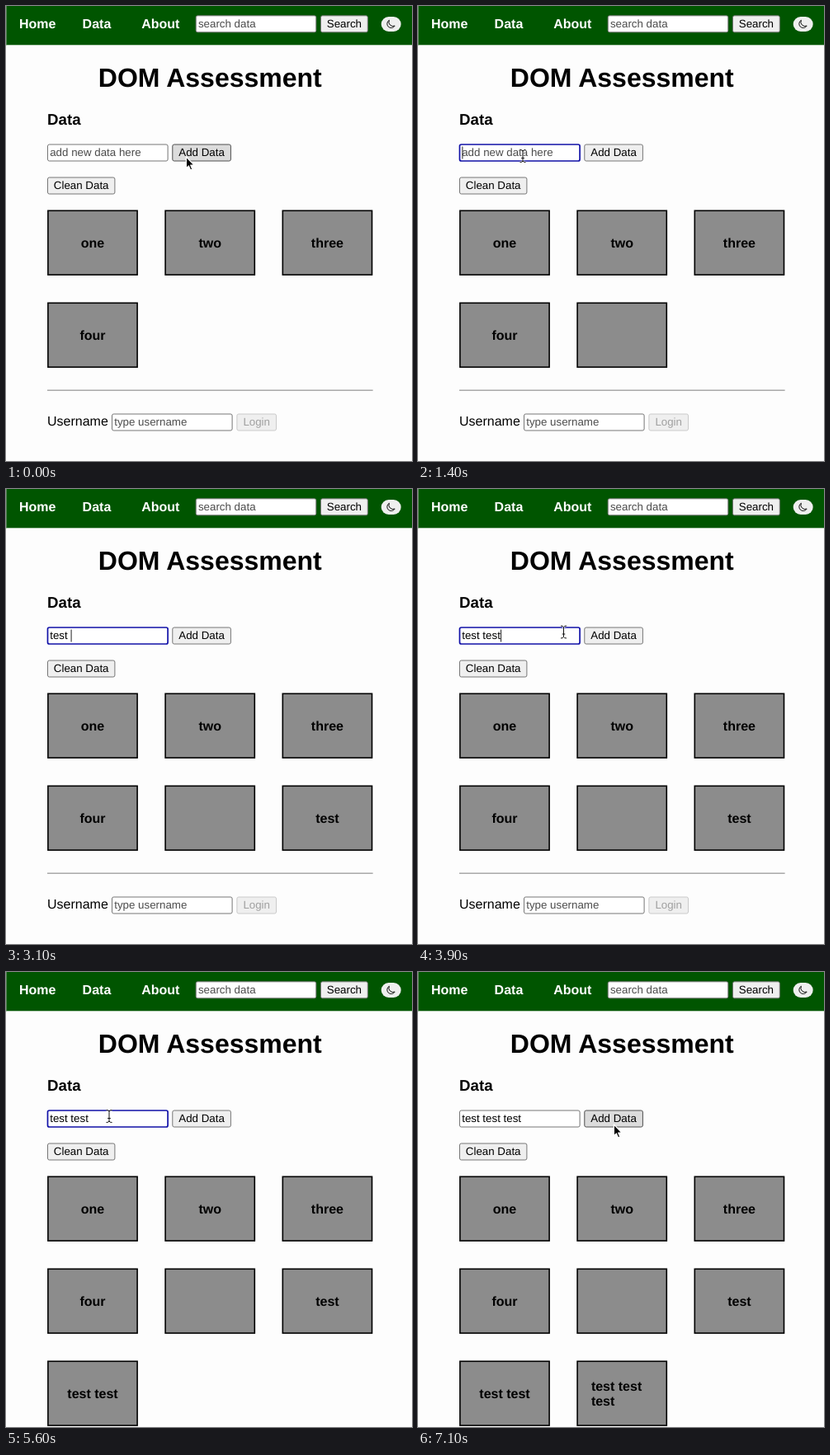
Animation, 492 px wide and 552 px high, one loop 7200 ms. Source, as an HTML page:

```html
<!DOCTYPE html>
<html lang="en">
<head>
<meta charset="utf-8">
<title>DOM Assessment</title>
<style>
html, body { margin: 0; width: 100%; height: 100%; overflow: hidden; background: #fdfdfd; }
svg { display: block; }
text { font-family: "Liberation Sans", Arial, sans-serif; font-size: 13.333px; white-space: pre; text-rendering: geometricPrecision; }
.bold { font-weight: bold; font-size: 16px; }
.mid { text-anchor: middle; }
.hint { fill: #4c4c4c; }
</style>
</head>
<body>
<svg id="stage" width="492" height="552" viewBox="0 0 492 552"></svg>
<script>
const NS = "http://www.w3.org/2000/svg";
const stage = document.getElementById("stage");

function set(el, attrs) {
  for (const k in attrs) el.setAttribute(k, attrs[k]);
}
function add(parent, tag, attrs, text) {
  const el = document.createElementNS(NS, tag);
  set(el, attrs);
  if (text !== undefined) el.textContent = text;
  return parent.appendChild(el);
}
function show(el, on) {
  el.style.display = on ? "" : "none";
}

// Form controls are 21px high, centred on cy.
function box(parent, x, cy, w, fill, stroke) {
  return add(parent, "rect", { x: x + 0.5, y: cy - 10, width: w - 1, height: 20, rx: 2, fill, stroke });
}
function field(parent, x, cy, hint) {
  const frame = box(parent, x, cy, 146.6, "#fff", "#767676");
  const label = add(parent, "text", { x: x + 3.2, y: cy + 4, class: "hint" }, hint);
  return { frame, label };
}
function button(parent, x, cy, w, label, off) {
  const frame = box(parent, x, cy, w, "#efefef", off ? "#cacaca" : "#767676");
  add(parent, "text", { x: x + w / 2, y: cy + 4, class: "mid", fill: off ? "#a0a0a0" : "#000" }, label);
  return frame;
}

add(stage, "rect", { width: 492, height: 552, fill: "#fdfdfd" });

// Header
add(stage, "rect", { width: 492, height: 47.3, fill: "#005500" });
add(stage, "rect", { width: 0.8, height: 47.3, fill: "#6d936d" });
["Home", "Data", "About"].forEach((s, i) =>
  add(stage, "text", { x: 16 + i * 71.6 + (i ? 5 : 0), y: 27, class: "bold", fill: "#fff" }, s));
field(stage, 229.7, 21.8, "search data");
button(stage, 381, 21.8, 57.8, "Search");
add(stage, "rect", { x: 454.7, y: 13, width: 24, height: 18, rx: 9, fill: "#efefef" });
add(stage, "path", {
  d: "M464.4 17.2A5 5 0 1 0 471.2 24A5.1 5.1 0 0 1 464.4 17.2Z",
  fill: "none", stroke: "#111", "stroke-linejoin": "round"
});

// Page
add(stage, "text", { x: 247.3, y: 98, class: "bold mid", style: "font-size:32px" }, "DOM Assessment");
add(stage, "text", { x: 50, y: 144, class: "bold", style: "font-size:18.72px" }, "Data");
const entry = field(stage, 50, 178, "");
const caret = add(stage, "rect", { y: 170.5, width: 1, height: 15, fill: "#222" });
const addBtn = button(stage, 201.3, 178, 71.6, "Add Data");
button(stage, 50, 218, 82.4, "Clean Data");

// Each round: go to the field, click, type a word evenly, click the button.
const rounds = [
  { go: 1000, focus: 1400, first: 1600, last: 2000, press: 2400, word: "test", spot: [127, 182], end: [226, 173], dip: 0 },
  { go: 2500, focus: 2900, first: 3100, last: 3700, press: 4100, word: " test", spot: [127, 177], end: [226, 170], dip: 0 },
  { go: 4500, focus: 5100, first: 5700, last: 6300, press: 6900, word: " test", spot: [125, 175], end: [237, 185], dip: 36 }
];
const presses = [800, ...rounds.map(r => r.press)];
const shown = presses.map(t => t + 100);

const keys = rounds.flatMap(r => [...r.word].map((ch, i, all) => {
  const t = r.first + (r.last - r.first) * i / (all.length - 1);
  return { ch, at: Math.round(t / 100) * 100 };
}));

const moves = [{ at: 0, dur: 600, to: [225, 179], dip: 0 }].concat(rounds.flatMap(r => [
  { at: r.go, dur: r.focus - r.go, to: r.spot, dip: r.dip / 2 },
  { at: r.last, dur: 400, to: r.end, dip: r.dip }
]));

// Cards: lines of text and the time each one appears
const words = ["one", "two", "three", "four", "", "test", "test test", "test test\ntest"];
const cards = words.map((word, i) => {
  const x = 50 + (i % 3) * 142.2, y = 247.4 + Math.floor(i / 3) * 112;
  const lines = word.split("\n"), wrap = lines.length > 1;
  const g = add(stage, "g", {});
  add(g, "rect", { x: x + 0.9, y: y + 0.9, width: 108.2, height: 77.8, fill: "#8c8c8c", stroke: "#000", "stroke-width": 1.6 });
  lines.forEach((s, n) => add(g, "text", {
    x: x + (wrap ? 17.7 : 55),
    y: y + 45.3 + (n - (lines.length - 1) / 2) * 18,
    class: wrap ? "bold" : "bold mid"
  }, s));
  return { g, at: i < 4 ? 0 : shown[i - 4] };
});

// Rule and login, pushed down by a third row of cards
const foot = add(stage, "g", {});
add(foot, "rect", { x: 50, y: 465.5, width: 394.6, height: 1.5, fill: "#a8a8a8" });
add(foot, "text", { x: 50, y: 509.3, style: "font-size:16px" }, "Username");
field(foot, 128, 505, "type username");
button(foot, 279.4, 505, 48.6, "Login", true);

// Pointers
const arrow = add(stage, "path", {
  d: "M0.4 0V13.8L3.4 11L5.6 16L7.8 15L5.7 10.1H10Z",
  fill: "#000", stroke: "#fff", "stroke-width": 1.2, "stroke-linejoin": "round"
});
const beam = add(stage, "g", { fill: "none" });
const beamPath = "M-3.5 -7.5Q-0.5 -7.5 0 -6Q0.5 -7.5 3.5 -7.5M0 -6V6M-3.5 7.5Q-0.5 7.5 0 6Q0.5 7.5 3.5 7.5M-1.8 2.5H1.8";
add(beam, "path", { d: beamPath, stroke: "#fff", "stroke-width": 2.4, opacity: 0.7 });
add(beam, "path", { d: beamPath, stroke: "#111" });

function pointer(t) {
  let x = 218, y = 183;
  for (const m of moves) {
    const k = Math.min(1, Math.max(0, (t - m.at) / m.dur)), e = k * k * (3 - 2 * k);
    x += (m.to[0] - x) * e;
    y += (m.to[1] - y) * e + m.dip * Math.sin(Math.PI * k);
  }
  return { x, y };
}

function draw(time) {
  const t = Math.floor((time % 7200) / 100) * 100;
  const { x, y } = pointer(t);
  const done = keys.filter(k => k.at <= t);
  const text = done.map(k => k.ch).join("");
  const lastKey = done.length ? done[done.length - 1].at : 0;
  const active = rounds.find(r => t >= r.focus && t < r.press);

  entry.label.textContent = text || "add new data here";
  entry.label.setAttribute("class", text ? "" : "hint");
  set(entry.frame, active
    ? { stroke: "#1212a8", "stroke-width": 1.7 }
    : { stroke: "#767676", "stroke-width": 1 });
  show(caret, active && (t - Math.max(active.focus, lastKey)) % 1000 < 500);
  caret.setAttribute("x", 53.4 + (text ? entry.label.getComputedTextLength() : 0));

  // The pointer hides while typing.
  const seen = !rounds.some(r => t >= r.first && t <= r.last);
  const level = Math.abs(y - 178) < 10.5;
  const inField = level && x > 50 && x < 197;
  const over = seen && level && x > 201 && x < 273;
  const down = presses.some(p => t >= p && t < p + 100);
  set(addBtn, {
    fill: down ? "#f3f3f3" : over ? "#dcdcdc" : "#efefef",
    stroke: down ? "#8d8d8d" : over ? "#4f4f4f" : "#767676"
  });

  cards.forEach(c => show(c.g, t >= c.at));
  foot.setAttribute("transform", `translate(0 ${t >= shown[2] ? 112 : 0})`);

  show(arrow, seen && !inField);
  show(beam, seen && inField);
  for (const el of [arrow, beam]) el.setAttribute("transform", `translate(${x} ${y})`);
}

let start = null;
function tick(now) {
  if (start === null) start = now;
  draw(now - start);
  requestAnimationFrame(tick);
}
draw(0);
requestAnimationFrame(tick);
</script>
</body>
</html>
```
